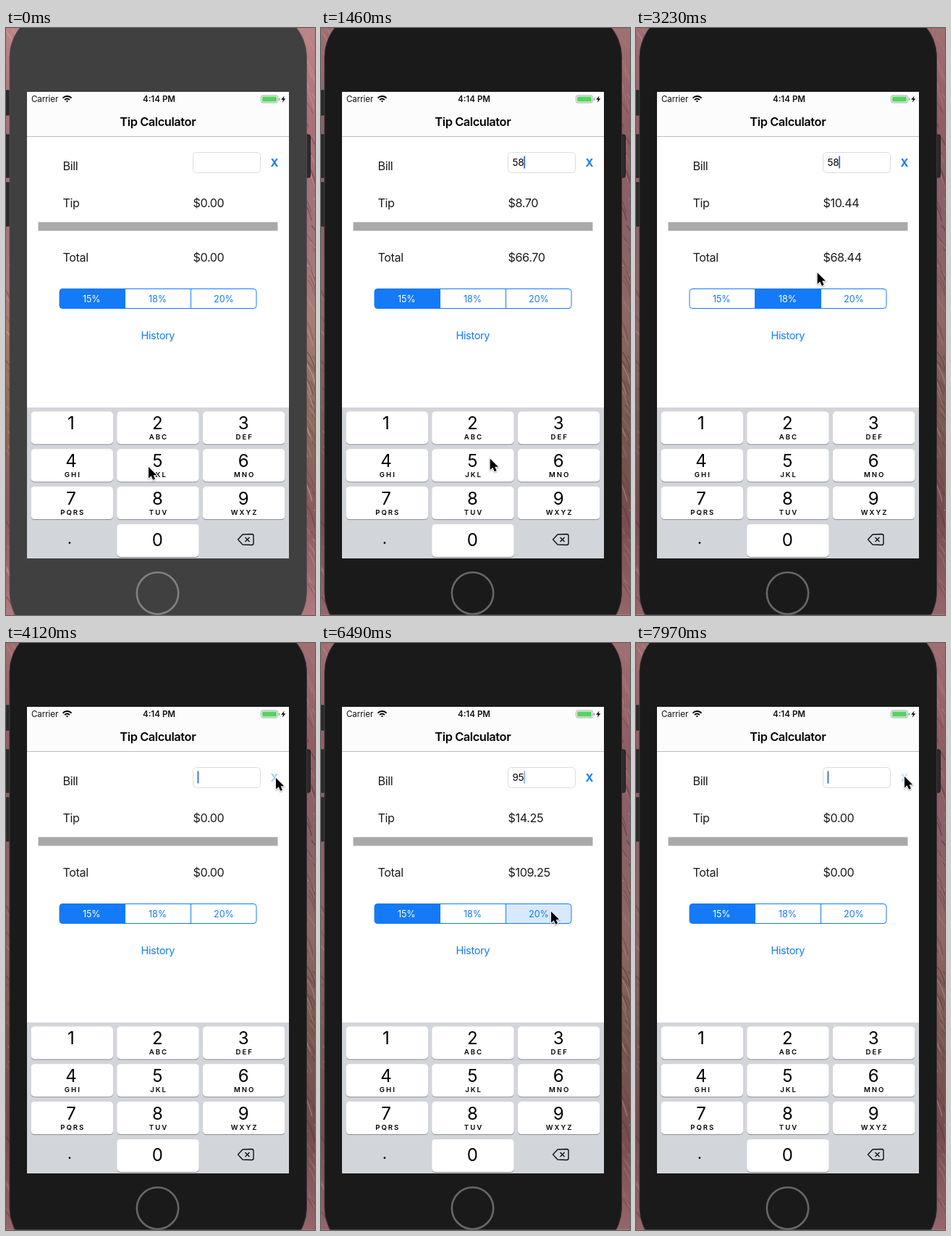
Animation of 427x809 px, one loop 8000 ms. Source, as an HTML page with a canvas:

```html
<!DOCTYPE html>
<html lang="en">
<head>
<meta charset="utf-8">
<title>Tip Calculator</title>
<style>
  html, body { margin: 0; width: 100%; height: 100%; overflow: hidden; background: #1a1a1a; }
  canvas { display: block; width: 427px; height: 809px; }
</style>
</head>
<body>
<canvas id="stage"></canvas>
<script>
const W = 427, H = 809, LOOP = 8000, STEP = 148;
const BLUE = '#147af8', INK = '#1c1c1e';
const canvas = document.getElementById('stage');
const ctx = canvas.getContext('2d');
const dpr = window.devicePixelRatio || 1;
canvas.width = W * dpr;
canvas.height = H * dpr;

// Timelines: [step, value]
const bills = [[0, ''], [5, '5'], [8, '58'], [27, ''], [35, '9'], [40, '95'], [53, '']];
const rates = [[0, 0], [19, 1], [27, 0], [45, 2], [53, 0]];
const keyDown = [[0, 0], [3, 5], [5, 0], [34, 9], [37, 0], [39, 5], [41, 0]];
const segDown = [[0, -1], [18, 1], [19, -1], [43, 2], [45, -1]];
const clearDown = [[0, 1], [26, 0.45], [28, 0.38], [29, 1], [52, 0.45], [54, 0.25]];
const path = [
  [0, 197, 605], [4, 207, 603], [6, 205, 646], [9, 205, 646], [13, 388, 310],
  [16, 205, 384], [21, 205, 384], [24, 381, 204], [26, 373, 186], [28, 373, 186],
  [32, 345, 659], [34, 346, 652], [36, 346, 652], [39, 207, 603], [40, 207, 603],
  [41, 232, 484], [44, 318, 370], [46, 318, 370], [48, 396, 166], [50, 372, 185], [54, 371, 184]
];
const percents = [15, 18, 20];
const letters = ['', 'ABC', 'DEF', 'GHI', 'JKL', 'MNO', 'PQRS', 'TUV', 'WXYZ'];

function entryAt(list, k) {
  let hit = list[0];
  for (const e of list) if (e[0] <= k) hit = e;
  return hit;
}
const valueAt = (list, k) => entryAt(list, k)[1];

function pointerAt(k) {
  const i = path.findIndex(p => p[0] > k);
  if (i < 0) return path[path.length - 1].slice(1);
  const a = path[i - 1], b = path[i];
  const u = (k - a[0]) / (b[0] - a[0]), e = u * u * (3 - 2 * u);
  return [a[1] + (b[1] - a[1]) * e, a[2] + (b[2] - a[2]) * e];
}

function caretAlpha(k) {
  const edit = valueAt(bills, k) === '' && k < 5 ? -750 : entryAt(bills, k)[0] * STEP - 36;
  const phase = (k * STEP - 36 - edit) % 1000;
  if (phase < 520) return 1;
  if (phase < 680) return (680 - phase) / 160;
  return phase < 860 ? 0 : (phase - 860) / 140;
}

function box(x, y, w, h, r, fill, stroke, line = 1) {
  ctx.beginPath();
  ctx.roundRect(x, y, w, h, r);
  if (fill) { ctx.fillStyle = fill; ctx.fill(); }
  if (stroke) { ctx.strokeStyle = stroke; ctx.lineWidth = line; ctx.stroke(); }
}

function text(s, x, y, size, o = {}) {
  const { color = INK, weight = 400, align = 'left', track = -0.025 * size } = o;
  ctx.font = `${weight} ${size}px Inter, Roboto, sans-serif`;
  ctx.letterSpacing = track + 'px';
  ctx.textAlign = align;
  ctx.fillStyle = color;
  ctx.fillText(s, align === 'center' ? x + track / 2 : x, y);
}

function lines(points, close) {
  ctx.beginPath();
  points.forEach(([x, y], i) => i ? ctx.lineTo(x, y) : ctx.moveTo(x, y));
  if (close) ctx.closePath();
}

function wallpaper(active) {
  const g = ctx.createLinearGradient(0, 0, 0, H);
  ['#bd8588', '#a97076', '#a2747a', '#a87c76', '#8d6a5e', '#8a5a5c', '#b07a80']
    .forEach((c, i) => g.addColorStop(i / 6, c));
  ctx.fillStyle = g;
  ctx.fillRect(0, 0, W, H);
  let seed = 7;
  const rnd = () => (seed = seed * 16807 % 2147483647) / 2147483647;
  const hairs = ['#e3bcba', '#7a4048', '#c99a98', '#5c3a38'];
  ctx.lineWidth = 1.4;
  for (let i = 0; i < 190; i++) {
    const right = rnd() < 0.6, x = right ? 398 + rnd() * 29 : rnd() * 24 - 4, y = rnd() * H;
    ctx.globalAlpha = 0.25 + rnd() * 0.35;
    ctx.strokeStyle = hairs[i % 4];
    ctx.beginPath();
    ctx.moveTo(x, y);
    ctx.quadraticCurveTo(x + 7, y + 7, x + 12, y + 18 + rnd() * 16);
    ctx.stroke();
  }
  ctx.globalAlpha = 1;
  if (active) {
    ctx.fillStyle = 'rgba(30,15,15,.18)';
    ctx.fillRect(0, 0, W, H - 1);
  }
}

function phone(active) {
  for (const [y, h] of [[86, 34], [147, 59], [213, 60]]) box(-4, y, 10, h, 2, '#2b2b2c', '#1d1d1e');
  box(412, 147, 8.5, 59, 2, '#2b2b2c', '#1d1d1e');
  box(5, -24, 410.5, 866, 64, '#404040', '#58504f', 0.8);
  if (active) {
    ctx.save();
    ctx.beginPath();
    ctx.rect(0, 0, W, H - 1);
    ctx.clip();
    box(5, -24, 410.5, 866, 64, '#1a1a1a', '#3d3635', 0.8);
    ctx.restore();
  }
  ctx.beginPath();
  ctx.arc(209.5, 779, 28.7, 0, Math.PI * 2);
  ctx.strokeStyle = active ? '#676767' : '#808080';
  ctx.lineWidth = 2.6;
  ctx.stroke();
}

function statusBar() {
  ctx.fillStyle = '#fff';
  ctx.fillRect(29, 88, 362, 643);
  ctx.fillStyle = '#fcfcfc';
  ctx.fillRect(29, 88, 362, 61);
  ctx.fillStyle = '#bcbcbe';
  ctx.fillRect(29, 149, 362, 1);
  text('Carrier', 35, 102, 11.6, { color: '#111', track: -0.1 });
  text('4:14 PM', 211.5, 102, 11.6, { color: '#111', weight: 600, align: 'center', track: 0 });
  ctx.strokeStyle = '#000';
  ctx.lineWidth = 2;
  for (const r of [1.2, 4.7, 8.2]) {
    ctx.beginPath();
    ctx.arc(84.5, 102.3, r, -Math.PI * 0.76, -Math.PI * 0.24);
    ctx.stroke();
  }
  box(352.5, 93, 23, 10, 2.5, '#fff', '#9b9b9b', 0.9);
  box(354, 94.5, 20, 7, 1.2, '#55d461');
  box(376.8, 96.3, 1.4, 3.6, 0.7, '#9b9b9b');
  lines([[384.6, 93.4], [380.2, 98.8], [383, 98.8], [381.8, 102.8], [386.3, 97.2], [383.5, 97.2]], true);
  ctx.fillStyle = '#000';
  ctx.fill();
  text('Tip Calculator', 210, 134.5, 16.4, { color: '#000', weight: 600, align: 'center' });
}

function form(k) {
  const bill = valueAt(bills, k), rate = valueAt(rates, k), pressed = valueAt(segDown, k);
  const tip = Number(bill) * percents[rate] / 100;
  const money = n => '$' + n.toFixed(2);
  text('Bill', 78.5, 196, 16.2);
  text('Tip', 78.5, 246.5, 16.2);
  text('Total', 78.5, 322, 16.2);
  text(money(tip), 258.5, 247, 16.2);
  text(money(Number(bill) + tip), 258.5, 322, 16.2);
  ctx.fillStyle = '#a9a9a9';
  ctx.fillRect(44.5, 267.5, 331, 12);

  box(258.5, 171.5, 93, 28, 5, '#fff', '#dcdcde');
  text(bill, 264.5, 190, 13.5, { color: '#000' });
  const end = bill ? 264.5 + ctx.measureText(bill).width : 264.5;
  ctx.globalAlpha = caretAlpha(k);
  ctx.fillStyle = '#426be0';
  ctx.fillRect(end, 176.5, 1.9, 17);
  ctx.globalAlpha = valueAt(clearDown, k);
  text('X', 371, 191, 14.8, { color: BLUE, weight: 700, align: 'center', track: 0 });
  ctx.globalAlpha = 1;

  const edges = [74, 164.5, 255.5, 346];
  ctx.save();
  ctx.beginPath();
  ctx.roundRect(74, 359.5, 272, 27, 4);
  ctx.clip();
  edges.slice(0, 3).forEach((x, i) => {
    ctx.fillStyle = i === rate ? BLUE : i === pressed ? '#d9e9fc' : '#fff';
    ctx.fillRect(x, 359, edges[i + 1] - x, 28);
    if (i) { ctx.fillStyle = BLUE; ctx.fillRect(x - 0.5, 359, 1, 28); }
  });
  ctx.restore();
  box(74, 359.5, 272, 27, 4, null, BLUE);
  percents.forEach((p, i) => text(p + '%', [118.3, 209.5, 301][i], 377.5, 12.6,
    { color: i === rate ? '#fff' : BLUE, align: 'center', track: -0.1 }));
  text('History', 210, 429, 14.5, { color: BLUE, align: 'center' });
}

function keypad(down) {
  ctx.fillStyle = '#d2d5da';
  ctx.fillRect(29, 523, 362, 208);
  const key = (label, sub, col, row) => {
    const x = 34.5 + col * 118.7, y = 528.5 + row * 51.8, mid = x + 56.5;
    box(x, y + 1, 113.5, 45, 5, '#8b8d91');
    box(x, y, 113.5, 45, 5, label === down ? '#b7c3d1' : '#fff');
    const base = label ? 553.3 + row * 52 : 714;
    text(String(label), mid - (col ? 0.3 : 1), base, 24, { color: '#000', align: 'center', track: 0 });
    text(sub, mid + 0.3, 566.5 + row * 52, 9.6, { color: '#000', weight: 600, align: 'center', track: 2 });
  };
  letters.forEach((s, i) => key(i + 1, s, i % 3, Math.floor(i / 3)));
  key(0, '', 1, 3);
  text('.', 88, 711, 22, { color: '#000', align: 'center', track: 0 });

  ctx.strokeStyle = '#111';
  ctx.lineWidth = 1.4;
  ctx.lineJoin = 'round';
  ctx.beginPath();
  ctx.moveTo(320.5, 705);
  ctx.lineTo(327, 698);
  ctx.lineTo(339.5, 697.5);
  ctx.quadraticCurveTo(342, 697.5, 342, 700);
  ctx.lineTo(342, 710);
  ctx.quadraticCurveTo(342, 712.5, 339.5, 712.5);
  ctx.lineTo(327, 712);
  ctx.closePath();
  ctx.stroke();
  for (const d of [-3, 3]) {
    lines([[333.5 - 3, 705 - d], [333.5 + 3, 705 + d]]);
    ctx.stroke();
  }
}

function pointer([x, y]) {
  ctx.save();
  ctx.translate(x, y);
  lines([[0, 0], [0, 15.5], [3.7, 12.2], [6.2, 17.8], [9, 16.6], [6.6, 11.2], [11.3, 11.2]], true);
  ctx.shadowColor = 'rgba(0,0,0,.35)';
  ctx.shadowBlur = 2 * dpr;
  ctx.shadowOffsetY = dpr;
  ctx.lineJoin = 'miter';
  ctx.lineWidth = 1.8;
  ctx.strokeStyle = '#fff';
  ctx.stroke();
  ctx.shadowColor = 'transparent';
  ctx.fillStyle = '#000';
  ctx.fill();
  ctx.restore();
}

function draw(k) {
  ctx.setTransform(dpr, 0, 0, dpr, 0, 0);
  wallpaper(k > 0);
  phone(k > 0);
  statusBar();
  form(k);
  keypad(valueAt(keyDown, k) || null);
  pointer(pointerAt(k));
}

const start = performance.now();
let shown = -1;
function frame() {
  const t = (performance.now() - start) % LOOP;
  const k = t < 150 ? 0 : Math.floor((t + 36) / STEP);
  if (k !== shown) draw(shown = k);
  requestAnimationFrame(frame);
}
frame();
</script>
</body>
</html>
```
